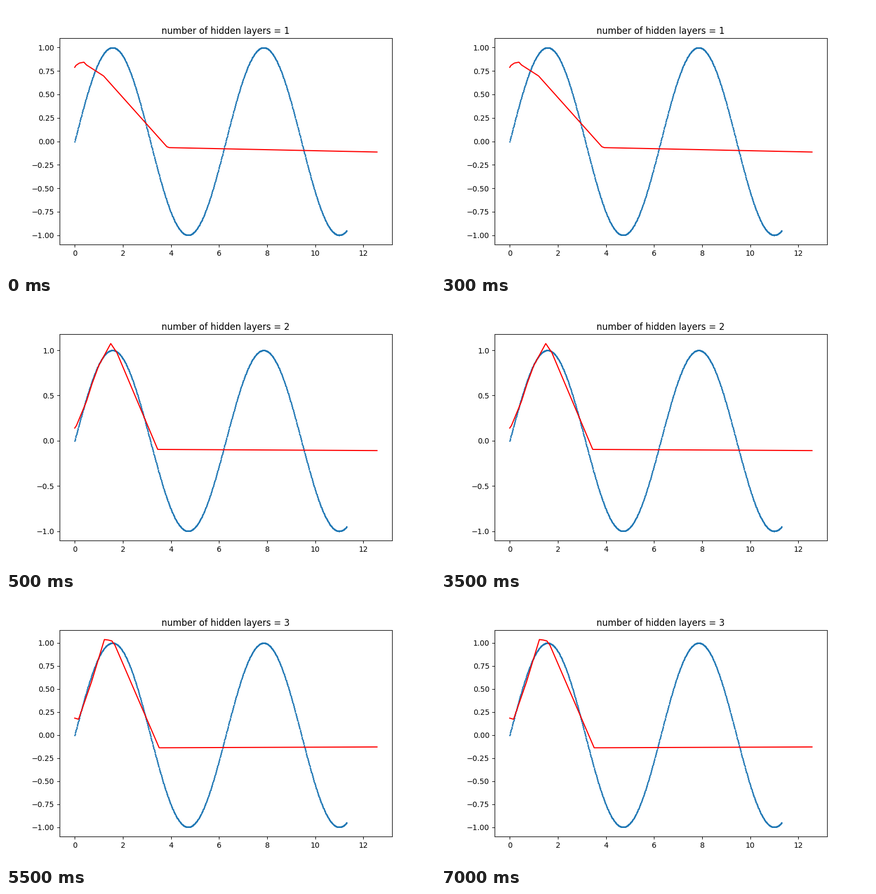
Animation of 800 by 500 pixels, one loop 8000 ms. Source, as a matplotlib script:

```python
import numpy as np
import matplotlib.pyplot as plt
from matplotlib.animation import FuncAnimation

STEP = 500   # ms per frame
FRAMES = 16
STARTS = (0, 500, 5500)   # ms at which each depth appears
END = 4 * np.pi

# A ReLU network gives a piecewise-linear curve: these are its corners
FITS = (
    [(0, .789), (.05, .809), (.19, .834), (.38, .844), (.49, .814),
     (1.2, .697), (3.83, -.057), (3.93, -.067), (END, -.114)],
    [(0, .14), (.07, .167), (.486, .434), (.72, .63), (1, .832),
     (1.497, 1.0748), (1.75, .975), (3.45, -.096), (END, -.109)],
    [(0, .184), (.16, .172), (.7, .58), (1.233, 1.0376), (1.4, 1.032),
     (1.545, 1.022), (1.67, .977), (3.51, -.138), (END, -.129)],
)

# The data covers the first nine tenths of the range
x = np.linspace(0, END, 1000)[:900]

fig, ax = plt.subplots(figsize=(8, 5), dpi=100)


def draw(frame):
    depth = sum(frame * STEP >= start for start in STARTS)
    ax.clear()
    ax.scatter(x, np.sin(x), s=1)
    ax.plot(*zip(*FITS[depth - 1]), color="red")
    ax.set_title(f"number of hidden layers = {depth}")
    return ax.get_children()


anim = FuncAnimation(fig, draw, frames=FRAMES, interval=STEP,
                     init_func=lambda: draw(0), repeat=True, repeat_delay=0)
plt.show()
```
